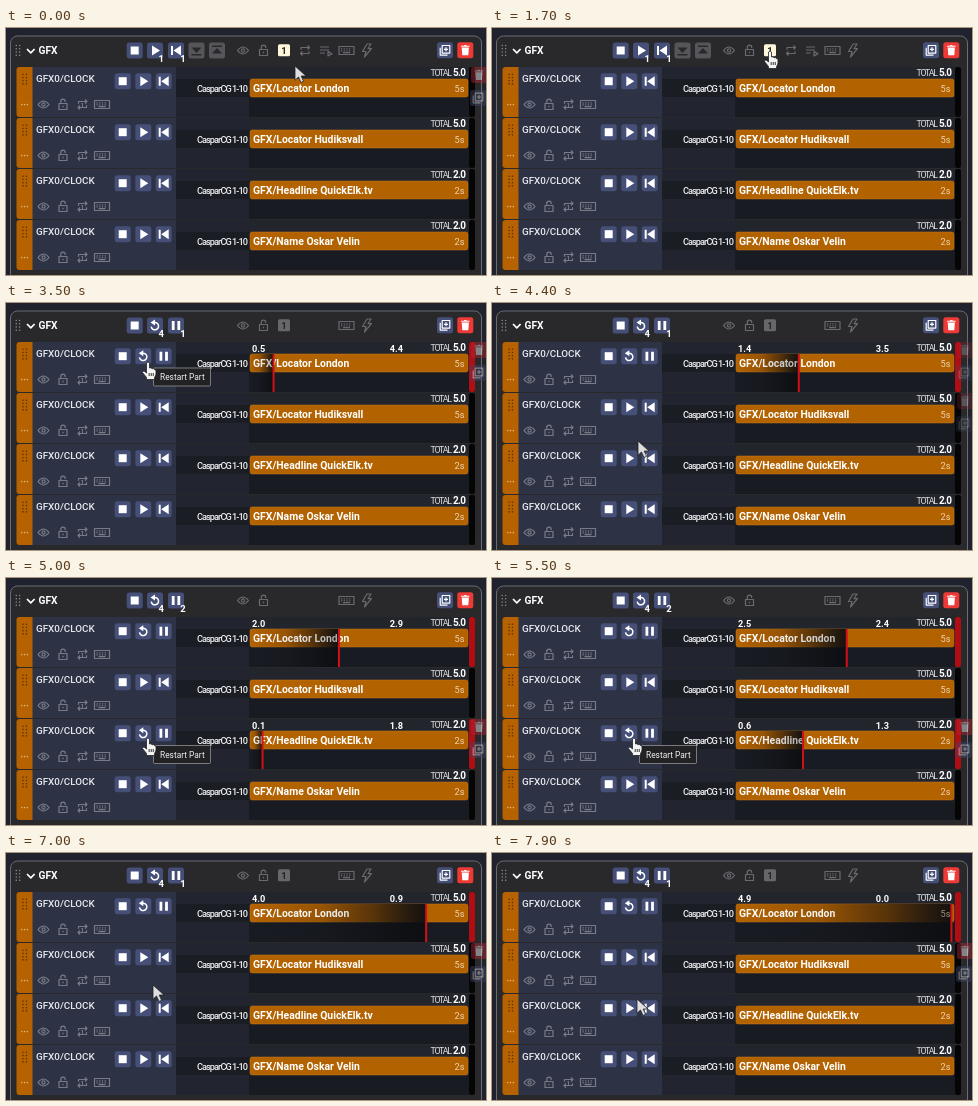
Recreate the animation shown at these times as an HTML page. Size 480 px wide and 247 px high, loop 8 s.

```html
<!DOCTYPE html>
<html lang="en">
<head>
<meta charset="utf-8">
<title>Rundown group</title>
<style>
html, body { margin: 0; width: 100%; height: 100%; overflow: hidden; background: #20232d; }
svg { display: block; width: 480px; height: 247px; font-family: Roboto, "Liberation Sans", sans-serif; }
text { white-space: pre; }
.b { font-weight: 700; }
.m { font-weight: 500; }
.line { fill: none; stroke-width: 1.2; stroke-linejoin: round; }
.end { text-anchor: end; }
.mid { text-anchor: middle; }
</style>
</head>
<body>
<svg id="stage" viewBox="0 0 480 247"></svg>
<script>
const LOOP = 8000, STEP = 100, CLICK = 1800;
const BAR_X = 244, BAR_W = 218;
const rows = [
  { name: 'GFX/Locator London', secs: 5, start: 2960 },
  { name: 'GFX/Locator Hudiksvall', secs: 5 },
  { name: 'GFX/Headline QuickElk.tv', secs: 2, start: 4885 },
  { name: 'GFX/Name Oskar Velin', secs: 2 }
];
// time, x, y, pointing hand
const moves = [
  [0, 289, 38, 0], [1000, 289, 38, 0], [1400, 279, 26, 1], [1600, 278, 23, 1],
  [2000, 278, 23, 1], [2200, 225, 36, 0], [2500, 142, 59, 1], [3900, 142, 59, 1],
  [4100, 146, 80, 0], [4300, 147, 112, 0], [4400, 146, 138, 0], [4700, 142, 160, 1],
  [6100, 142, 160, 1], [6300, 146, 138, 0], [6400, 147, 131.5, 0], [7000, 147, 132, 0],
  [7800, 145, 146, 0], [8000, 145, 146, 0]
];
// time, hovered row
const hovers = [[-1000, 0], [1200, -1], [2300, 0], [4300, 1], [4600, 2], [6400, 1]];
// from, to, x, y, label
const tips = [
  [2600, 2960, 147, 64.5, 'Play Part'], [2960, 4000, 147, 64.5, 'Restart Part'],
  [4790, 4885, 147, 167, 'Play Part'], [4885, 6200, 147, 167, 'Restart Part']
];

const rect = (x, y, w, h, fill, r = 0, more = '') =>
  `<rect x="${x}" y="${y}" width="${w}" height="${h}" rx="${r}" fill="${fill}" ${more}/>`;
const text = (x, y, s, size, fill = '#fff', cls = '', more = '') =>
  `<text x="${x}" y="${y}" font-size="${size}" fill="${fill}" class="${cls}" ${more}>${s}</text>`;
const group = (id, body, x = 0, y = 0) => `<g id="${id}" transform="translate(${x} ${y})">${body}</g>`;
const at = (x, y, body) => `<g transform="translate(${x} ${y})">${body}</g>`;
const line = (d, color) => `<path class="line" stroke="${color}" d="${d}"/>`;
const solid = (d, color = '#fff') => `<path fill="${color}" d="${d}"/>`;

const shapes = {
  eye: 'M-5.5 0Q0-7 5.5 0Q0 7-5.5 0ZM-1.6 0a1.6 1.6 0 1 0 3.2 0a1.6 1.6 0 1 0-3.2 0',
  lock: 'M-4-1H4V5H-4ZM-2.2-1V-3.2A2.2 2.2 0 0 1 2.2-3.2V-2.4M0 1.2V2.8',
  loop: 'M-4-.8V-3H4.5M2.5-5L4.5-3L2.5-1M4 .8V3H-4.5M-2.5 1L-4.5 3L-2.5 5',
  list: 'M-6-3.5H3M-6-.5H3M-6 2.5H-1M2 1L6 3.2L2 5.4Z',
  keys: 'M-7.5-4H7.5V4H-7.5ZM-5.5-1.6H-4.3M-2.8-1.6H-1.6M-.1-1.6H1.1M2.6-1.6H3.8M-5.5.3H-4.3M-2.8.3H-1.6M-.1.3H1.1M2.6.3H3.8M-3.5 2.2H3.5',
  bolt: 'M0-6.5L-4.5 1H-1L-2.5 6.5L4.5-1.8H1L4-6.5Z'
};
const icon = (name, x, y, color = '#696a70') => at(x, y, line(shapes[name], color));

const glyphs = {
  stop: rect(-4, -4, 8, 8, '#fff'),
  play: solid('M-3-5L5 0L-3 5Z'),
  prev: solid('M-5-4.5H-3V4.5H-5ZM5-5V5L-2.5 0Z'),
  pause: solid('M-4.2-4.5H-1.4V4.5H-4.2ZM1.4-4.5H4.2V4.5H1.4Z'),
  restart: '<path class="line" stroke="#fff" style="stroke-width:1.5" d="M-.8-3A3.7 3.7 0 1 1-3.8 1.2"/>' + solid('M-4.5-3L0-6V0Z'),
  up: solid('M-5-5H5V-3.6H-5ZM0-2.5L5 3H-5Z', '#29292c'),
  down: solid('M-5 5H5V3.6H-5ZM0 2.5L5-3H-5Z', '#29292c'),
  copy: line('M-2.8-4.8H4.8V2.8H-2.8ZM-4.8-2.5V4.8H2.5M1-3V1M-1-1H3', '#fff'),
  trash: solid('M-3.6-2.8H3.6L3 5H-3ZM-4.3-4.5H-1.5L-1-5.3H1L1.5-4.5H4.3V-3.5H-4.3Z')
};
const button = (name, x, y, fill = '#454f78') =>
  at(x, y, rect(-8, -8, 16, 16, fill, 2.5) + glyphs[name]);
const dots = (x, y, color) => {
  let s = '';
  for (let i = 0; i < 8; i++) s += rect(x + i % 2 * 3.4, y + (i >> 1) * 3.2, 1.5, 1.5, color, .7);
  return s;
};

function header() {
  return dots(9.5, 16.8, '#8b8b8e') +
    '<path class="line" stroke="#fff" style="stroke-width:1.7" d="M21 21L24.8 24.8L28.6 21"/>' +
    text(32.5, 26.2, 'GFX', 10.2, '#fff', 'b') +
    button('stop', 128.7, 22.5) +
    group('idle', button('play', 149, 22.5) + button('prev', 170, 22.5)) +
    group('live', button('restart', 149, 22.5) + button('pause', 170, 22.5)) +
    text(158, 34.3, '', 9.5, '#fff', 'b end', 'id="countA"') +
    text(179.8, 34.3, '', 9.5, '#fff', 'b end', 'id="countB"') +
    group('single', button('down', 190.5, 22.5, '#56565a') + button('up', 211, 22.5, '#56565a') +
      icon('loop', 299, 22.5) + icon('list', 320, 22.5)) +
    icon('eye', 237, 22.5) + icon('lock', 257.5, 22.5) +
    group('badge', rect(-6, -6, 12, 12, '#fff6dc', 1.5, 'id="badgeBox"') +
      text(0, 3.5, '1', 9.5, '#242427', 'b mid'), 278, 22.3) +
    icon('keys', 340.5, 22.5) + icon('bolt', 361, 22.5) +
    button('copy', 439, 22.3) + button('trash', 459.3, 22.3, '#ee3a36');
}

function row({ name, secs }, i) {
  const y = Math.floor(39 + 51.3 * i);
  return at(0, y,
    rect(26, 0, 144, 50, '#2d3344') + rect(170, 0, 74, 50, '#22252f') +
    rect(170, 12, 73, 18, '#1b1d25') + rect(243, 0, 220, 50, '#191b23') +
    rect(243, 0, 220, 12, '#23252d') + rect(463, 0, 6, 50, '#050506', 2) +
    '<path fill="#b66200" d="M26.5 0V50H13.5Q10.5 50 10.5 47V3Q10.5 0 13.5 0Z"/>' +
    dots(16.3, 6.5, '#583000') +
    [15, 17.8, 20.6].map(x => rect(x, 36.8, 1.6, 1.6, '#e6b56e', .8)).join('') +
    text(30, 15.2, 'GFX0/CLOCK', 9.85, '#e9eaf0', 'm') +
    ['eye', 'lock', 'loop', 'keys'].map((n, k) => icon(n, 37.5 + k * 19.5, 37.5, '#777b88')).join('') +
    text(76.3, 40, '1', 5.5, '#858995', 'b mid') +
    button('stop', 116.7, 14.2) +
    group('idle' + i, button('play', 137.3, 14.2) + button('prev', 157.7, 14.2)) +
    group('live' + i, button('restart', 137.3, 14.2) + button('pause', 157.7, 14.2) +
      rect(463, 0, 6, 50, '#b10e14', 2)) +
    text(191, 24.8, 'CasparCG 1-10', 9.2, '#f0f0f3', 'm', 'letter-spacing="-.95"') +
    rect(BAR_X, 12, BAR_W, 18, '#b36200', 2, 'stroke="#c77a18" stroke-width=".5"') +
    group('past' + i, rect(BAR_X, 12, 0, 38, 'url(#fade)', 0, `id="shade${i}"`)) +
    text(247, 25, name, 10.4, '#fff', 'b') +
    text(458.5, 25, secs + 's', 9.2, '#eed3ae', 'end') +
    text(424.5, 8.5, 'TOTAL', 8.8, '#e2e2e4', '', 'letter-spacing="-1.25"') +
    text(447, 8.5, secs + '.0', 10, '#fff', 'b', 'letter-spacing="-.7"') +
    group('run' + i,
      `<use href="#shade${i}" opacity=".4"/>` +
      rect(0, 12, 2, 38, '#d11117', 0, `id="head${i}"`) +
      text(246, 10, '', 9.2, '#fff', 'b', `id="gone${i}"`) +
      text(397, 10, '', 9.2, '#fff', 'b end', `id="left${i}"`)) +
    group('side' + i, button('trash', 473, 8, '#b82834') + button('copy', 472, 31, '#3f486b')));
}

const arrow = '<path d="M0 0V14.2L3.5 11L6 16.5L8.6 15.3L6.2 10H11Z" fill="#dedede" stroke="#222" stroke-width=".8"/>';
const hand = '<path d="M-1.5 1Q0-1 1.5 1V6Q3.2 5 4 6.7Q5.7 6 6.3 7.5Q8 7 8 9V12Q7.6 14 6.5 15.5V17.5H-1.5V15.5L-5.5 10.5Q-5.5 8.2-3.3 9.4L-1.5 11Z" fill="#f4f4f4" stroke="#222" stroke-width=".8"/>' +
  line('M1.2 11V14M3.3 11V14M5.3 11V14', '#555');

const fade = [[0, 0], [.4, .12], [.7, .45], [1, .93]].map(([at, alpha]) =>
  `<stop offset="${at}" stop-color="#0d0e11" stop-opacity="${alpha}"/>`).join('');
document.getElementById('stage').innerHTML =
  `<defs><linearGradient id="fade">${fade}</linearGradient></defs>` +
  rect(0, 0, 480, 247, '#20232d') +
  rect(4.5, 8, 471, 260, '#29292c', 7, 'stroke="#6b6c72" stroke-width="1"') +
  header() + rows.map(row).join('') +
  group('tip', rect(.5, .5, 57, 18, '#222225', 1, 'id="tipBox" stroke="#929294" stroke-width=".8"') +
    text(7, 12.7, '', 8.4, '#f0f0f0', '', 'id="tipText"')) +
  group('cursor', group('arrow', arrow) + group('hand', hand));

const el = {};
document.querySelectorAll('[id]').forEach(n => el[n.id] = n);
const show = (id, on) => el[id].style.display = on ? '' : 'none';
const put = (id, x, y) => el[id].setAttribute('transform', `translate(${x} ${y})`);
const tenths = s => (Math.floor(s * 10 + 1e-6) / 10).toFixed(1);

function drawRow({ secs, start }, i, t) {
  const s = (t - start) / 1000, on = s >= 0 && s < secs;
  show('idle' + i, !on);
  for (const part of ['live', 'past', 'run']) show(part + i, on);
  if (on) {
    const w = BAR_W * s / secs;
    el['shade' + i].setAttribute('width', w);
    el['head' + i].setAttribute('x', BAR_X + w - 1);
    el['gone' + i].textContent = tenths(s);
    el['left' + i].textContent = tenths(secs - s);
  }
  return on;
}

function drawHover(t) {
  const k = hovers.findLastIndex(h => h[0] <= t);
  const mix = Math.min(1, (t - hovers[k][0]) / 200);
  rows.forEach((_, i) => {
    const now = hovers[k][1] === i, before = k > 0 && hovers[k - 1][1] === i;
    el['side' + i].style.opacity = .42 * (now ? mix : before ? 1 - mix : 0);
  });
}

function drawCursor(t) {
  const k = Math.min(moves.findLastIndex(m => m[0] <= t), moves.length - 2);
  const [t0, x0, y0, point] = moves[k], [t1, x1, y1] = moves[k + 1];
  const p = (t - t0) / (t1 - t0);
  put('cursor', x0 + (x1 - x0) * p, y0 + (y1 - y0) * p);
  show('hand', point);
  show('arrow', !point);
}

function draw(t) {
  const live = rows.filter((r, i) => drawRow(r, i, t)).length;
  const single = t < CLICK;
  show('idle', !live);
  show('live', live);
  show('single', single);
  show('badge', live < 2);
  el.badgeBox.setAttribute('fill', single ? '#fff6dc' : '#67676b');
  el.countA.textContent = single ? 1 : 4;
  el.countB.textContent = single ? 1 : live || 4;
  const tip = tips.find(([from, to]) => t >= from && t < to);
  show('tip', tip);
  if (tip) {
    put('tip', tip[2], tip[3]);
    el.tipText.textContent = tip[4];
    el.tipBox.setAttribute('width', tip[4].length > 9 ? 57 : 47);
  }
  drawHover(t);
  drawCursor(t);
}

const origin = performance.now();
function tick() {
  const t = (performance.now() - origin) % LOOP;
  draw(Math.floor(t / STEP) * STEP);
  requestAnimationFrame(tick);
}
tick();
</script>
</body>
</html>
```
